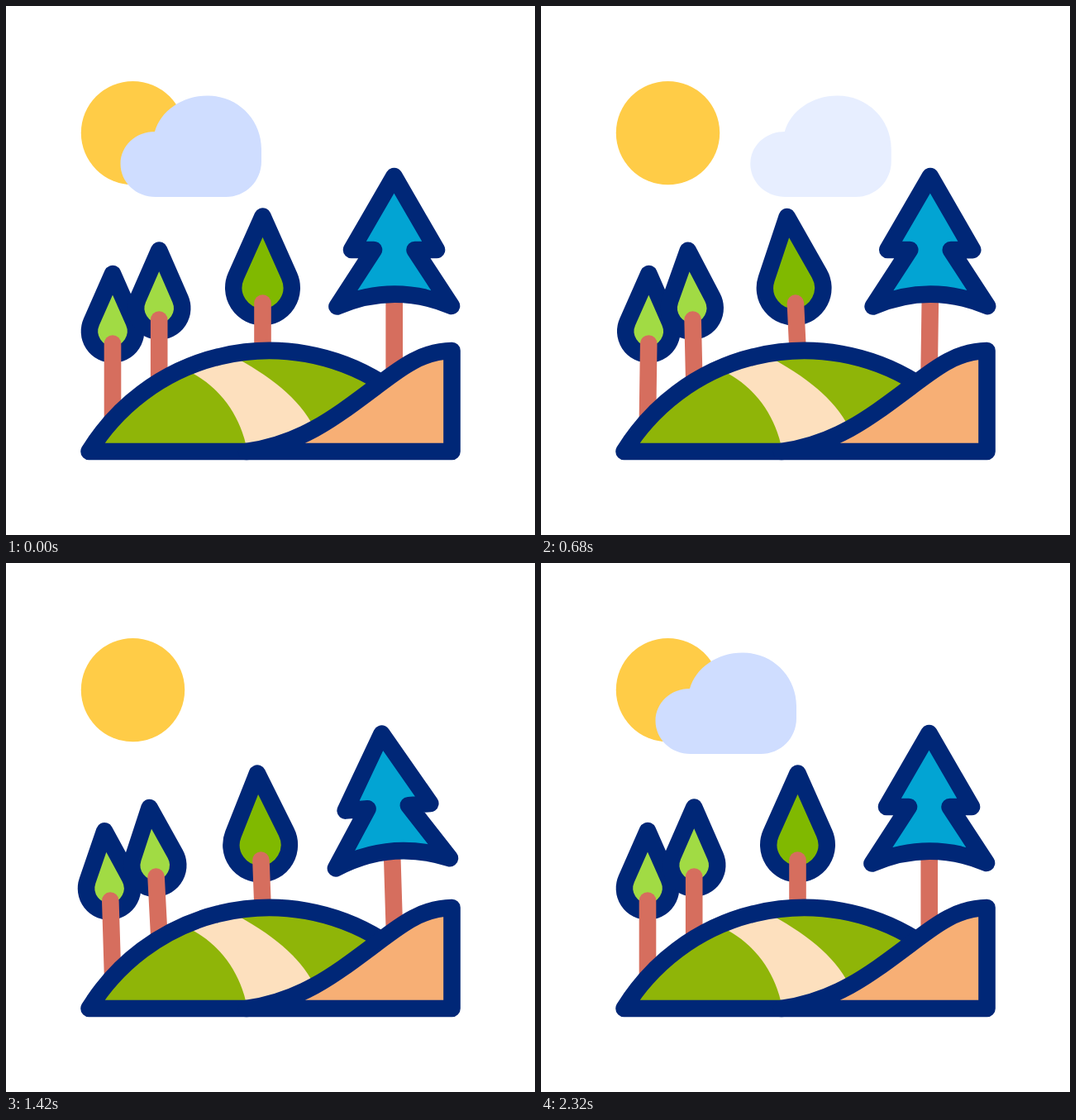
Animation, 640 px wide and 640 px high, one loop 2.4 s. Source, as an HTML page:

```html
<!DOCTYPE html>
<html lang="en">
<head>
<meta charset="utf-8">
<title>Windy hills</title>
<style>
html, body { margin: 0; width: 100%; height: 100%; overflow: hidden; background: #fff; }
svg { display: block; width: 100%; height: 100%; }
.line { stroke: #002777; stroke-width: 20.6; stroke-linecap: round; stroke-linejoin: round; }
.trunk { stroke: #d66e5e; stroke-width: 20.6; stroke-linecap: round; }
</style>
</head>
<body>
<svg viewBox="0 0 640 640">
  <circle cx="153.5" cy="153.6" r="62.7" fill="#ffcc47"/>
  <path id="cloud" fill="#cfddff" d="M181 231C157 231 138.5 213 138.5 191S157 152 180 152C187 127 213 108.5 244 108.5C280 108.5 309 137 309 173V188C309 212 290 231 266 231Z"/>
  <g id="trees"></g>
  <path fill="#8fb508" d="M100.5 539A256 256 0 0 1 453 455L443 464C395 500 355 530 291 539Z"/>
  <path fill="#fde0be" d="M215 439C258 458 284 495 292 539L374 512C355 475 322 449 270 421Z"/>
  <path class="line" fill="none" d="M291 539H100.5A256 256 0 0 1 453 455"/>
  <path class="line" fill="#f7af75" d="M291 539C355 530 395 500 443 464C475 440 500 418 539.5 417V539Z"/>
</svg>
<script>
const LOOP = 2400;
const NS = "http://www.w3.org/2000/svg";

// [time, value] keys: radians for the swing, px for the drift
const trunkKeys = [[0, 0], [400, -.049], [860, .046], [1285, -.052], [1700, .033], [2000, 0]];
const crownKeys = [[60, 0], [500, -.053], [940, .057], [1390, -.055], [1790, .042], [2100, 0]];
const leaveKeys = [[20, 0], [1440, 256]];
const enterKeys = [[1440, -138], [2200, 0]];

const clamp = v => Math.min(1, Math.max(0, v));
const smooth = s => s * s * (3 - 2 * s);

function at(keys, t) {
  let value = keys[0][1];
  for (let i = 1; i < keys.length; i++) {
    const [t0, a] = keys[i - 1], [t1, b] = keys[i];
    if (t > t0) value = a + (b - a) * smooth(clamp((t - t0) / (t1 - t0)));
  }
  return value;
}

function add(parent, name, attrs = {}) {
  const el = document.createElementNS(NS, name);
  for (const key in attrs) el.setAttribute(key, attrs[key]);
  return parent.appendChild(el);
}

// Pointed drop: two tangents from the tip to a circle
function drop(x, tip, cy, r) {
  const sin = r / (cy - tip), dx = r * Math.sqrt(1 - sin * sin), y = cy - r * sin;
  return `M${x} ${tip}L${x + dx} ${y}A${r} ${r} 0 1 1 ${x - dx} ${y}Z`;
}

const pine = "M469.5 206L521 295H494.5L539 363Q469.5 334 400.5 363.5L445 295H418Z";
const specs = [
  { x: 129, top: 408.5, base: 497, delay: 0, fill: "#a1db44", shape: drop(129, 324, 393.5, 28) },
  { x: 185.2, top: 379.5, base: 450, delay: 120, fill: "#a1db44", shape: drop(185.2, 295.5, 365.5, 28) },
  { x: 310.5, top: 359.5, base: 415, delay: 240, fill: "#80b900", shape: drop(310.5, 254.5, 341, 35.2) },
  { x: 469.7, top: 355, base: 437, delay: 0, fill: "#02a4d3", shape: pine, behind: true }
];

const trees = specs.map(s => {
  const group = add(document.getElementById("trees"), "g");
  const trunk = () => add(group, "path", { class: "trunk", d: `M${s.x} ${s.top}V${s.base + 14}` });
  if (s.behind) trunk();
  const crown = add(group, "path", { class: "line", fill: s.fill, d: s.shape });
  if (!s.behind) trunk();
  return { ...s, group, crown };
});

const cloud = document.getElementById("cloud");

function turn(el, angle, x, y) {
  el.setAttribute("transform", `rotate(${angle * 180 / Math.PI} ${x} ${y})`);
}

function draw(t) {
  for (const tree of trees) {
    turn(tree.group, at(trunkKeys, t - tree.delay), tree.x, tree.base);
    turn(tree.crown, at(crownKeys, t - tree.delay), tree.x, tree.top);
  }
  const leaving = t < 1440;
  const x = at(leaving ? leaveKeys : enterKeys, t);
  const alpha = leaving ? 1 - (t - 500) / 360 : (t - 1440) / 320;
  cloud.setAttribute("transform", `translate(${x} 0)`);
  cloud.setAttribute("opacity", clamp(alpha));
}

const start = performance.now();
function tick() {
  draw((performance.now() - start) % LOOP);
  requestAnimationFrame(tick);
}
tick();
</script>
</body>
</html>
```
